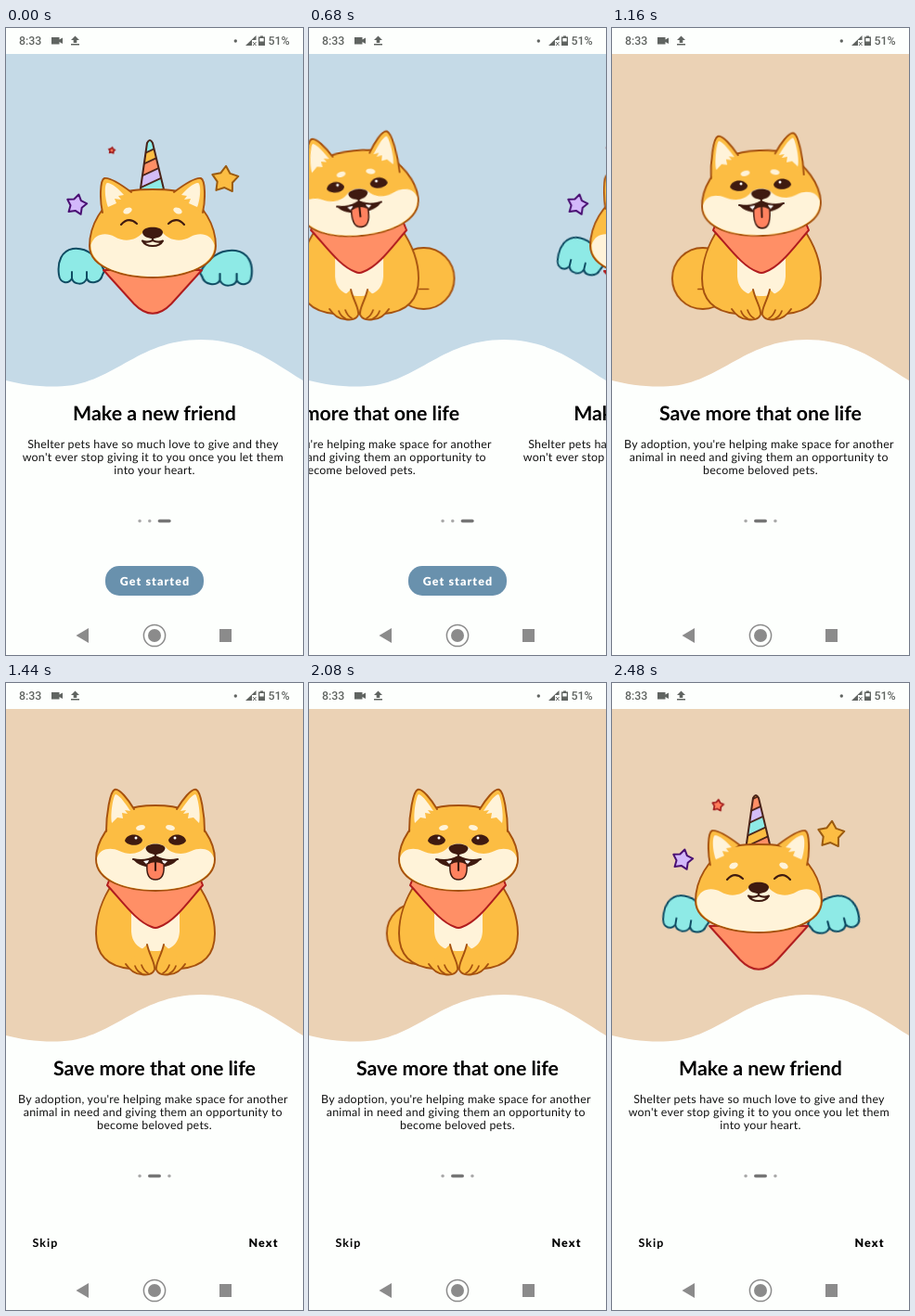
Recreate the animation shown at these times as an HTML page. Size 320 px wide and 676 px high, loop 2520 ms.

```html
<!DOCTYPE html>
<html lang="en">
<head>
<meta charset="utf-8">
<title>Pet adoption intro</title>
<style>
html, body { margin: 0; width: 100%; height: 100%; overflow: hidden; background: #fdfffd; }
svg.stage { display: block; width: 100vw; height: 100vh; }

/* every track shares one 2520 ms loop */
.sky, .friend, .save, .pill, .last, .start, .nav, .wing, .ear, .scarf, .spark, .stripes, .tail, .head, .far-ear, .tongue {
  animation: 2520ms linear infinite;
}
.wing, .ear, .scarf, .spark, .tail, .head, .far-ear, .tongue { animation-timing-function: cubic-bezier(.37, 0, .63, 1); }

/* pages */
.friend { animation-name: friend; }
@keyframes friend {
  0%, 21.43% { transform: none; animation-timing-function: cubic-bezier(.4, 0, .2, 1); }
  34.52% { transform: translateX(320px); }
  84.13% { transform: translateX(320px); animation-timing-function: cubic-bezier(.4, 0, .2, 1); }
  97.62%, 100% { transform: none; }
}
.save { animation-name: save; }
@keyframes save {
  0%, 21.43% { transform: translateX(-320px); animation-timing-function: cubic-bezier(.4, 0, .2, 1); }
  34.52% { transform: none; }
  84.13% { transform: none; animation-timing-function: cubic-bezier(.4, 0, .2, 1); }
  97.62%, 100% { transform: translateX(-320px); }
}
.sky { animation-name: sky; }
@keyframes sky { 0%, 36.5% { fill: #c5dae7; } 45.2%, 100% { fill: #ebd2b5; } }
.pill { animation-name: pill; }
@keyframes pill {
  0%, 36.5% { width: 3.5px; fill: #aaa; }
  45.2%, 100% { width: 14px; fill: #757575; }
}
.last { animation-name: last; }
@keyframes last {
  0%, 36.5% { x: 163.7px; width: 14px; fill: #757575; }
  45.2%, 100% { x: 174.2px; width: 3.5px; fill: #aaa; }
}
.start { animation-name: start; animation-timing-function: step-end; }
@keyframes start { 0% { visibility: visible; } 45.6%, 100% { visibility: hidden; } }
.nav { animation-name: nav; animation-timing-function: step-end; }
@keyframes nav { 0% { visibility: hidden; } 47.2%, 100% { visibility: visible; } }

/* flying friend */
.wing { --swing: 21deg; transform-origin: 106px 262px; animation-name: flap; }
.wing.big { --swing: 29deg; }
@keyframes flap {
  0%, 38.1%, 90.8% { transform: none; }
  19.05% { transform: translate(-4px, -8px) rotate(var(--swing)); }
  100% { transform: translate(-2px, -4px) rotate(calc(var(--swing) * .47)); }
}
.ear { animation-name: ear; }
@keyframes ear {
  0%, 38.1%, 90.8% { transform: none; }
  19.05% { transform: translate(4px, -6px); }
  100% { transform: translate(2px, -3px); }
}
.scarf { animation-name: scarf; }
@keyframes scarf {
  0%, 38.1%, 90.8% { transform: none; }
  19.05% { transform: translateY(2px); }
  100% { transform: translateY(1px); }
}
.spark { animation-name: spark; }
@keyframes spark {
  0%, 38.1%, 90.8% { transform: translate(114px, 132px) rotate(8deg) scale(.34); }
  19.05% { transform: translate(114px, 132px) rotate(8deg) scale(.95); }
  100% { transform: translate(114px, 132px) rotate(8deg) scale(.66); }
}
.stripes { animation-name: stripes; }
@keyframes stripes {
  0% { transform: none; }
  38.1% { transform: translateY(48px); }
  83.33% { transform: translateY(9px); }
  100% { transform: translateY(30px); }
}

/* sitting dog */
.tail { animation-name: tail; }
@keyframes tail {
  0% { transform: translateX(-44px); }
  8.53% { transform: translateX(-69px); }
  28.37%, 68.06% { transform: translateX(69px); }
  48.21%, 87.9% { transform: translateX(-69px); }
  100% { transform: translateX(0); }
}
.head { transform-origin: 161px 200px; animation-name: head; }
@keyframes head {
  0%, 34.9% { transform: translateX(1px) rotate(-6deg); }
  54.8%, 100% { transform: none; }
}
.far-ear { animation-name: far-ear; }
@keyframes far-ear {
  0%, 46% { transform: translateX(-6px); }
  56%, 100% { transform: none; }
}
.tongue { transform-origin: 161px 195px; animation-name: tongue; }
@keyframes tongue {
  0%, 34.9% { transform: scaleY(1.15); }
  46% { transform: scale(.95, 1.22); }
  56%, 100% { transform: none; }
}

.fur { fill: #fcbd43; stroke: #a5510f; stroke-width: 1.9; }
.cream { fill: #fff3d9; }
.dark { fill: #3f1a10; }
.ink { fill: none; stroke: #3f1a10; stroke-width: 2.1; }
.line { fill: none; stroke: #a5510f; stroke-width: 1.7; }
.cloth { fill: #ff8f66; stroke: #b01c1e; stroke-width: 2; }
.aqua { fill: #8eeae6; stroke: #0f4c63; stroke-width: 2; }
.art { stroke-linecap: round; stroke-linejoin: round; }
text { font-family: Lato, sans-serif; text-rendering: geometricPrecision; }
.title { font-size: 21.33px; font-weight: 700; text-anchor: middle; }
.copy { font-size: 12.44px; letter-spacing: .24px; text-anchor: middle; fill: #111; }
.label { font-size: 12.44px; font-weight: 900; letter-spacing: 1.11px; }
.status { fill: #606461; }
.status text { font: 500 12.4px Roboto, sans-serif; }
</style>
</head>
<body>
<svg class="stage" viewBox="0 0 320 676">
  <defs>
    <path id="star" vector-effect="non-scaling-stroke" d="M0-10 3.4-4.700 9.500-3.100 5.500 1.800 5.900 8.100 0 5.800-5.900 8.100-5.500 1.800-9.500-3.100-3.400-4.700Z"/>
    <g id="wing">
      <path class="aqua" d="M106 262C100 248 88 236 72 238C60 240 55 252 57 266C58 275 67 277 71 270C73 277 84 278 87 270C90 277 102 275 104 266Z"/>
      <path class="aqua" d="M71 270V263M87 270V263"/>
    </g>
    <g id="ear">
      <path class="fur" d="M104 199C101 186 101 164 106 162C111 161 123 168 135 177"/>
      <path class="cream" d="M110 193C106 182 106 168 109 167C114 167 122 174 127 180L121 181 124 185 117 184 119 189Z"/>
    </g>
    <g id="pup-ear">
      <path class="fur" d="M108 160C108 142 112 117 117 115C122 113 132 126 138 136"/>
      <path class="cream" d="M114 151C112 140 116 121 118 120C123 121 130 132 134 138L128 137 131 141 125 140 126 146 120 145Z"/>
    </g>
    <g id="paw">
      <path class="fur" d="M152 282C155 295 161 302 160 309C158 315 150 315 146 314C139 314 133 309 129 303"/>
      <path class="line" d="M139 305Q141 311 146 313M146 304Q148 310 153 313"/>
    </g>
    <g id="eye">
      <path class="dark" d="M128 170C130 162 143 161 147 169C147 176 131 177 128 170Z"/>
      <circle cx="140" cy="167" r="1.500" fill="#fff"/>
      <ellipse class="cream" cx="145" cy="156" rx="5" ry="2.800" transform="rotate(-15 145 156)"/>
    </g>
    <g id="smile">
      <path class="ink" d="M124 212Q132 203 141 211"/>
      <ellipse class="cream" cx="131" cy="197" rx="5" ry="3.200" transform="rotate(-25 131 197)"/>
    </g>
    <path id="horn" d="M144 180 152 124Q155 118 158 124L171.500 180Z"/>
    <clipPath id="horn-clip"><use href="#horn"/></clipPath>
    <pattern id="candy" width="400" height="48" patternUnits="userSpaceOnUse" patternTransform="translate(0 11.700) skewY(-25)">
      <path fill="#fcbd43" d="M0 0H400V12H0Z"/>
      <path fill="#ff8f66" d="M0 12H400V24H0Z"/>
      <path fill="#d3bdf8" d="M0 24H400V36H0Z"/>
      <path fill="#8eeae6" d="M0 36H400V48H0Z"/>
      <path stroke="#4a2318" stroke-width="2" d="M0 1H400M0 12H400M0 24H400M0 36H400"/>
    </pattern>
  </defs>

  <rect width="320" height="676" fill="#fdfffd"/>
  <path class="sky" d="M0 28H320V380C290 362 260 336 210 336C140 336 115 386 55 386.500C35 387 15 384 0 380Z"/>

  <g class="save">
    <g class="art">
      <g class="tail">
        <circle class="fur" cx="163" cy="270" r="33"/>
        <path class="line" d="M158 281.500H168"/>
      </g>
      <path class="fur" d="M115 216C104 232 97 252 97 270C97 295 112 306 134 308H188C210 306 225 295 225 270C225 252 217 232 206 216Z"/>
      <path class="cream" d="M135 235V268C136 284 148 289 161 289C174 289 186 284 187 268V235Z"/>
      <use href="#paw"/>
      <use href="#paw" transform="translate(322) scale(-1 1)"/>
      <path class="cloth" d="M113 208 109 218C125 235 140 257 157 263Q161 265 165 263C182 257 197 235 212 218L208 208Z"/>
      <g class="head">
        <path class="fur" d="M161 132C146 132 138 133 130 137C112 150 97 170 97 190C97 214 130 224 161 224C192 224 225 214 225 190C225 170 210 150 192 137C184 133 176 132 161 132Z"/>
        <use href="#pup-ear"/>
        <g class="far-ear"><use href="#pup-ear" transform="translate(322) scale(-1 1)"/></g>
        <path class="cream" d="M98 189C101 178 113 177 122 181C134 187 145 183 150 177Q161 169 172 177C177 183 188 187 200 181C209 177 221 178 224 189C224 213 192 223 161 223C130 223 98 213 98 189Z"/>
        <use href="#eye"/>
        <use href="#eye" transform="translate(322) scale(-1 1)"/>
        <path class="dark" d="M137 190Q150 193 161 187Q172 193 185 190C181 196 172 199 161 199C150 199 141 196 137 190Z"/>
        <path class="ink" d="M137 190Q150 193 161 187Q172 193 185 190M161 183V188"/>
        <path fill="#fff" d="M148 192 154 191 152 196ZM174 192 168 191 170 196Z"/>
        <g class="tongue">
          <path d="M152 195C151 208 155 212 161 212C167 212 171 208 170 195Q161 190 152 195Z" fill="#ff825f" stroke="#3f1a10" stroke-width="1.500"/>
          <path class="ink" d="M161 192V202"/>
        </g>
        <path class="dark" d="M150.500 178C152 172 170 172 171.500 178C171 183 164 185 161 185C158 185 151 183 150.500 178Z"/>
      </g>
    </g>
    <text class="title" x="160" y="422.500">Save more that one life</text>
    <text class="copy">
      <tspan x="160" y="452.900">By adoption, you're helping make space for another</tspan>
      <tspan x="160" y="467.100">animal in need and giving them an opportunity to</tspan>
      <tspan x="160" y="481.300">become beloved pets.</tspan>
    </text>
  </g>

  <g class="friend">
    <g class="art">
      <use class="wing" href="#wing"/>
      <g transform="translate(209 264) scale(-1.130 1) translate(-106 -262)"><use class="wing big" href="#wing"/></g>
      <path class="cloth scarf" d="M105 261 138 297.500Q158 318 178 297.500L211 261Z"/>
      <g clip-path="url(#horn-clip)"><rect class="stripes" x="120" y="50" width="80" height="150" fill="url(#candy)"/></g>
      <use href="#horn" fill="none" stroke="#4a2318" stroke-width="2"/>
      <path class="fur" d="M158 174C140 174 128 175 122 180C104 190 90 212 90 235C90 260 130 269 158 269C186 269 226 260 226 235C226 212 212 190 194 180C188 175 176 174 158 174Z"/>
      <use class="ear" href="#ear"/>
      <g transform="translate(316) scale(-1 1)"><use class="ear" href="#ear"/></g>
      <path class="cream" d="M91.500 234C95 221 108 220 117 225C129 232 141 228 147 221Q158 213 169 221C175 228 187 232 199 225C208 220 221 221 224.500 234C225 259 186 268 158 268C130 268 91 259 91.500 234Z"/>
      <use href="#smile"/>
      <use href="#smile" transform="translate(316) scale(-1 1)"/>
      <path class="dark" d="M147 220C148 213 168 213 169 220C169 225 162 227 158 227C154 227 147 225 147 220Z"/>
      <path class="ink" d="M147 229.500Q152 232 158 229Q164 232 169 229.500Q166 235 158 235Q150 235 147 229.500M158 226V229"/>
      <use href="#star" transform="translate(236 163.500) rotate(4) scale(1.480)" fill="#fcbd43" stroke="#9a5a10" stroke-width="2"/>
      <use href="#star" transform="translate(76 190.500) rotate(12) scale(1.130)" fill="#d3b8fb" stroke="#4a1073" stroke-width="2"/>
      <use class="spark" href="#star" fill="#ff7d5c" stroke="#a01c1c" stroke-width="1.700"/>
    </g>
    <text class="title" x="160" y="422.500">Make a new friend</text>
    <text class="copy">
      <tspan x="160" y="452.900">Shelter pets have so much love to give and they</tspan>
      <tspan x="160" y="467.100">won't ever stop giving it to you once you let them</tspan>
      <tspan x="160" y="481.300">into your heart.</tspan>
    </text>
  </g>

  <rect x="142.300" y="529.800" width="3.500" height="3.500" rx="1.750" fill="#aaa"/>
  <rect class="pill" x="153" y="529.800" height="3.500" rx="1.750"/>
  <rect class="last" y="529.800" height="3.500" rx="1.750"/>

  <g class="start">
    <rect x="107" y="580" width="106" height="32" rx="15" fill="#6991ad"/>
    <text class="label" x="160.500" y="600.500" text-anchor="middle" fill="#fff">Get started</text>
  </g>
  <g class="nav">
    <text class="label" x="28.500" y="607.500" style="font-weight:700">Skip</text>
    <text class="label" x="261.500" y="607.500">Next</text>
  </g>

  <g class="status">
    <text x="14" y="18">8:33</text>
    <path d="M49 10H57.500V12.500L61 10.500V17L57.500 15V17.500H49ZM74.500 8.500 79 13H76.300V16H72.700V13H70ZM70 17H79V18.500H70Z"/>
    <circle cx="247.300" cy="14" r="1.700"/>
    <path d="M258 19 269.500 8V13H265V19Z"/>
    <path d="M266 15 269.500 19M269.500 15 266 19" stroke="#606461"/>
    <path d="M274 8.500H277V9.500H279V19H272V9.500H274ZM273.300 11V14.500H277.700V11Z" fill-rule="evenodd"/>
    <text x="282.500" y="18">51%</text>
  </g>
  <g fill="#8b8b8b">
    <path d="M75.500 655 89 647V663ZM230 648H243V662H230Z"/>
    <circle cx="160" cy="655" r="7"/>
    <circle cx="160" cy="655" r="11.600" fill="none" stroke="#8b8b8b" stroke-width="1.500"/>
  </g>
</svg>
</body>
</html>
```
